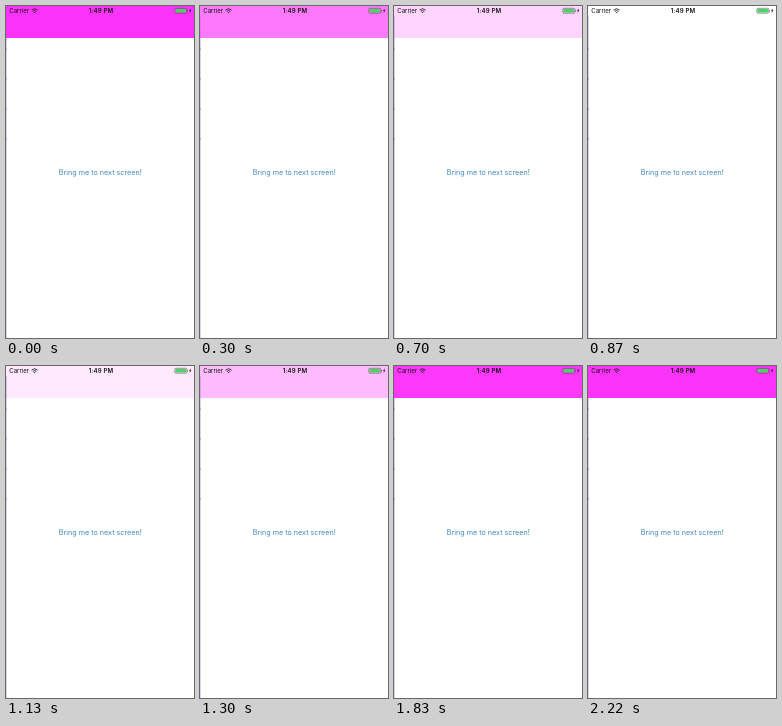
Recreate the animation shown at these times as an HTML page. Size 188 by 332 pixels, loop 2270 ms.

```html
<!DOCTYPE html>
<html lang="en">
<head>
<meta charset="utf-8">
<title>Fading navigation bar</title>
<style>
  html, body { margin: 0; width: 100%; height: 100%; overflow: hidden; background: #fff; }
  svg { display: block; width: 188px; height: 332px; }
  text { font-family: Inter, "Liberation Sans", sans-serif; }
  .bar { fill: #fc34fb; animation: fade 2270ms linear infinite; }
  .status { font-size: 6.1px; fill: #111; }
  .clock { font-weight: 600; letter-spacing: .15px; }
  .link { font-size: 7.2px; fill: #4288bf; }
  .edge { stroke: #d3d3f2; }
  .notch { stroke: #a9b4dc; stroke-dasharray: 2 28; }

  @keyframes fade {
    0% { opacity: 1; }
    13.2% { opacity: .66; }
    22.9% { opacity: .44; }
    38.3% { opacity: 0; }
    46.2% { opacity: 0; }
    57.3% { opacity: .33; }
    69.2% { opacity: .66; }
    81.5%, 100% { opacity: 1; }
  }
</style>
</head>
<body>
<svg viewBox="0 0 188 332">
  <rect width="188" height="332" fill="#fff"/>
  <path class="edge" d="M.5 10V332"/>
  <path class="notch" d="M.5 42V154"/>
  <rect class="bar" width="188" height="32"/>

  <text class="status" x="3.2" y="7">Carrier</text>
  <g fill="none" stroke="#222" stroke-width=".9">
    <path d="M25.6 4.1Q28.6 1.3 31.6 4.1M26.8 5.4Q28.6 3.7 30.4 5.4"/>
    <path d="M27.7 6.1L28.6 7.2L29.5 6.1Z" fill="#222" stroke="none"/>
  </g>
  <text class="status clock" x="95" y="7" text-anchor="middle">1:49 PM</text>

  <rect x="168.8" y="2.3" width="12" height="4.9" rx="1" fill="none" stroke="#555" stroke-width=".6"/>
  <rect x="169.5" y="3" width="10.5" height="3.5" rx=".4" fill="#4cd265"/>
  <path d="M181.3 4V5.6H182V4Z" fill="#555"/>
  <path d="M184.7 2.3L183 5H184L183.5 7.2L185.4 4.3H184.3Z" fill="#222"/>

  <text class="link" x="94.3" y="169" text-anchor="middle">Bring me to next screen!</text>
</svg>
</body>
</html>
```
